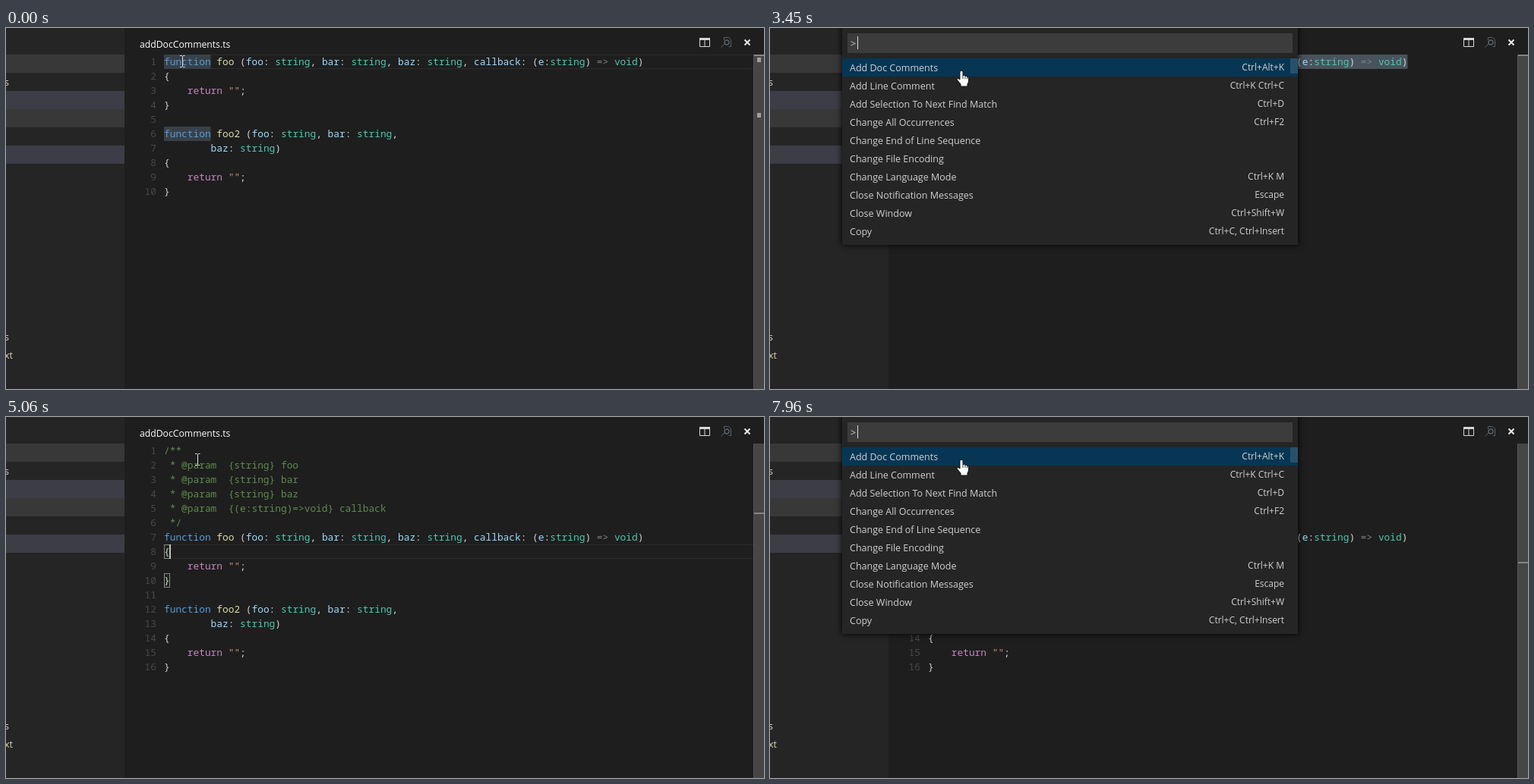
Animation, 998 px wide and 476 px high, one loop 8 s. Source, as an HTML page with a canvas:

```html
<!DOCTYPE html>
<html lang="en">
<head>
<meta charset="utf-8">
<title>Doc comments</title>
<style>
html, body { margin: 0; width: 100%; height: 100%; overflow: hidden; background: #1e1e1e; }
canvas { display: block; }
</style>
</head>
<body>
<canvas id="stage" width="998" height="476"></canvas>
<script>
const ctx = document.getElementById('stage').getContext('2d');
const LOOP = 8000, CH = 7.7, LH = 19, LEFT = 208, TOP = 35;
const MONO = '12.83px "Noto Sans Mono", monospace';
const ui = size => `${size}px "Open Sans", sans-serif`;

const code = [
  'function foo (foo: string, bar: string, baz: string, callback: (e:string) => void)',
  '{', '    return "";', '}', '',
  'function foo2 (foo: string, bar: string,', '        baz: string)',
  '{', '    return "";', '}'
];
const docs = [
  '/**', ' * @param  {string} foo', ' * @param  {string} bar', ' * @param  {string} baz',
  ' * @param  {(e:string)=>void} callback', ' */'
];
const commands = [
  ['Add Doc Comments', 'Ctrl+Alt+K'], ['Add Line Comment', 'Ctrl+K Ctrl+C'],
  ['Add Selection To Next Find Match', 'Ctrl+D'], ['Change All Occurrences', 'Ctrl+F2'],
  ['Change End of Line Sequence', ''], ['Change File Encoding', ''],
  ['Change Language Mode', 'Ctrl+K M'], ['Close Notification Messages', 'Escape'],
  ['Close Window', 'Ctrl+Shift+W'], ['Copy', 'Ctrl+C, Ctrl+Insert']
];

// Token pattern and colour, first match wins
const syntax = [
  [/^(\/\*\*| \*).*/, '#608b4e'], [/^function/, '#569cd6'], [/^foo2?(?= \()/, '#dcdcaa'],
  [/^return/, '#c586c0'], [/^"[^"]*"/, '#ce9178'], [/^\w+(?=:)/, '#9cdcfe'],
  [/^(string|void)/, '#4ec9b0'], [/^=>/, '#808080'], [/^ +/, ''], [/^./, '#d4d4d4']
];

// Each step changes part of the state; caret is [line, column],
// a selection part is [line, from column, to column, includes line break]
const steps = [
  [0, { lines: code, caret: [1, 3], on: false, words: [1, 6], sel: [], brackets: [], mouse: [232, 44], menu: false, bar: true }],
  [840, { mouse: [232, 43] }],
  [990, { mouse: [242, 50], on: true }],
  [1110, { mouse: [252, 56] }],
  [1410, { on: false }],
  [1940, { on: true }],
  [2090, { caret: [1, 0], on: true }],
  [2490, { caret: [1, 82], words: [], sel: [[1, 0, 82]] }],
  [3020, { on: false }],
  [3450, { menu: true, input: true }],
  [4080, { input: false }],
  [4230, { menu: false, lines: docs.concat(code), caret: [7, 82], on: true, sel: [[7, 0, 82]] }],
  [4660, { on: false }],
  [5060, { caret: [8, 1], on: true, sel: [], brackets: [8, 10] }],
  [5490, { caret: [9, 14], brackets: [] }],
  [5740, { caret: [10, 1], brackets: [8, 10] }],
  [5860, { caret: [11, 0], brackets: [] }],
  [6320, { caret: [12, 40] }],
  [6440, { caret: [12, 0], words: [7, 12] }],
  [6560, { caret: [13, 0], words: [], sel: [[12, 0, 40, true]] }],
  [6710, { caret: [14, 0], sel: [[12, 0, 40, true], [13, 0, 20, true]] }],
  [6980, { caret: [13, 20], sel: [[12, 0, 40, true], [13, 0, 20]] }],
  [7410, { on: false }],
  [7820, { menu: true, input: true, bar: false }],
  [7960, { bar: true }]
];

const lineY = n => TOP + (n - 1) * LH;
const colX = c => LEFT + c * CH;

function rect(x, y, w, h, color) {
  ctx.fillStyle = color;
  ctx.fillRect(x, y, w, h);
}

function text(str, x, y, color, font, align = 'left') {
  ctx.font = font;
  ctx.textAlign = align;
  ctx.fillStyle = color;
  ctx.fillText(str, x, y);
}

function trace(path, stroke, width, fill) {
  const p = new Path2D(path);
  if (fill) { ctx.fillStyle = fill; ctx.fill(p); }
  ctx.strokeStyle = stroke;
  ctx.lineWidth = width;
  ctx.stroke(p);
}

function drawSidebar() {
  rect(0, 0, 156, 476, '#252526');
  for (const [y, color] of [[35, '#383838'], [83, '#3d3d47'], [107, '#383838'], [155, '#3d3d47']])
    rect(0, y, 156, 24, color);
  text('s', -2, 76, '#d6d2c0', ui(12.5));
  text('s', -2, 412, '#e0d8b0', ui(12.5));
  text('xt', -2, 436, '#e0d8b0', ui(12.5));
}

function drawTitle() {
  text('addDocComments.ts', 176, 26, '#fff', ui(12.2));
  trace('M913.5 14.5h13v10h-13zM920 14v11', '#d8d8d8', 1);
  rect(913, 13, 14, 3, '#d8d8d8');
  trace('M945.5 16v-3.5h6l3 3v9h-3M941.5 25.5l4.5-4.5', '#596169', 1);
  trace('M952 19a3 3 0 1 1-6 0a3 3 0 1 1 6 0', '#596169', 1.4);
  trace('M972.5 15.5l7 7M979.5 15.5l-7 7', '#e8e8e8', 2);
}

function drawLine(line, n) {
  const base = lineY(n) + 14;
  text(n, 198, base, '#484848', MONO, 'right');
  for (let col = 0; col < line.length;) {
    const rest = line.slice(col);
    const [pattern, color] = syntax.find(([p]) => p.test(rest));
    const token = rest.match(pattern)[0];
    if (color) text(token, colX(col), base, color, MONO);
    col += token.length;
  }
}

function drawEditor(s) {
  const [row, col] = s.caret;
  if (!s.sel.length) {
    ctx.strokeStyle = '#2b2b2b';
    ctx.lineWidth = 1;
    ctx.strokeRect(LEFT + .5, lineY(row) + .5, 776, LH - 1);
  }
  for (const n of s.words) rect(LEFT, lineY(n), 8 * CH, LH, '#394048');
  const single = s.sel.length === 1 && !s.sel[0][3];
  ctx.fillStyle = single ? (s.menu ? '#48535d' : '#3a608a') : (s.menu ? '#3a3d41' : '#264f78');
  for (const [n, from, to, eol] of s.sel) {
    ctx.beginPath();
    ctx.roundRect(colX(from), lineY(n), (to - from) * CH + (eol ? 10 : 0), LH, single ? 0 : 3);
    ctx.fill();
  }
  for (const n of s.brackets) {
    rect(LEFT, lineY(n), 8, LH, '#1c251c');
    ctx.strokeStyle = '#888';
    ctx.lineWidth = 1;
    ctx.strokeRect(LEFT + .5, lineY(n) + .5, 7, LH - 1);
  }
  s.lines.forEach((line, i) => drawLine(line, i + 1));
  if (s.on && !s.menu) rect(Math.floor(colX(col)), lineY(row), 2, LH, '#c0c1bf');
}

function drawRuler(s) {
  const step = s.lines === code ? 14.8 : 13;
  rect(984, TOP, 14, 441, '#464646');
  rect(984, TOP, 1, 441, '#565656');
  rect(985, Math.round(TOP + (s.caret[0] - 1) * step), 13, 2, '#858585');
  for (const n of s.words) rect(989, Math.round(TOP + 4 + (n - 1) * step) - (n > 1), 5, 6, '#a0a0a0');
}

function drawMenu(s) {
  ctx.shadowColor = '#000';
  ctx.shadowBlur = 8;
  rect(95, -10, 600, 296, '#252526');
  ctx.shadowBlur = 0;
  rect(102, 7, 586, 26, '#3c3c3c');
  text('>', 106, 25, '#ccc', ui(12.5));
  if (s.input) rect(115, 11, 1, 17, '#ddd');
  rect(95, 40, 600, 24, '#073655');
  if (s.bar) rect(685, 40, 10, 20, '#29506b');
  commands.forEach(([name, keys], i) => {
    const y = 57 + i * 24;
    text(name, 105, y, '#d0d0d0', ui(12.5));
    text(keys, 677, y - 1, '#d0d0d0', ui(12), 'right');
  });
}

function drawMouse(s) {
  ctx.save();
  ctx.translate(...s.mouse);
  if (s.menu) {
    trace('M-2 1.5Q0-1.5 2 1.5V7Q4 5.5 5 7.5Q7 6.5 7.5 8.5Q10 8 9.5 11V15L8 18V21H-1V18L-6 12Q-6 9-2 12Z',
      '#111', 1, '#fff');
    trace('M2 7v4M5 8v3M7.5 9v2', '#111', .8);
  } else {
    trace('M-3-7.5h2.5l1 1l1-1h2M.5-7v14M-3 7.5h2.5l1-1l1 1h2', '#e4e4e4', 1);
  }
  ctx.restore();
}

function frame(now) {
  const t = now % LOOP;
  const s = Object.assign({}, ...steps.filter(([at]) => at <= t).map(([, change]) => change));
  rect(0, 0, 998, 476, '#1e1e1e');
  drawSidebar();
  drawTitle();
  drawEditor(s);
  drawRuler(s);
  if (s.menu) drawMenu(s);
  drawMouse(s);
}

const start = performance.now();
function tick() {
  frame(performance.now() - start);
  requestAnimationFrame(tick);
}
tick();
</script>
</body>
</html>
```
